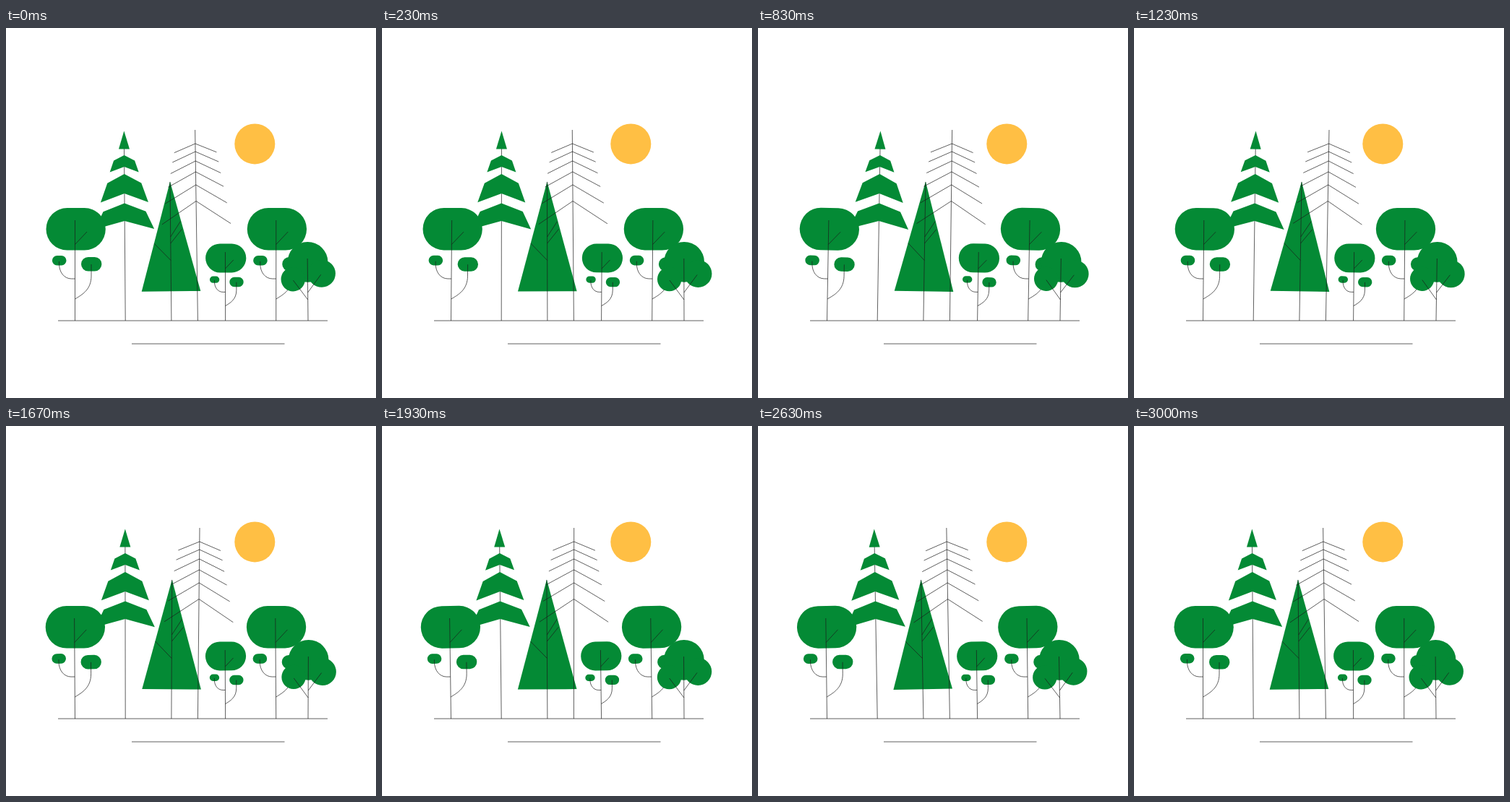
An HTML page for the animation above (3.03 s loop, 512 px wide and 512 px high).

```html
<!DOCTYPE html>
<html lang="en">
<head>
<meta charset="utf-8">
<title>Swaying trees</title>
<style>
  html, body { margin: 0; width: 100%; height: 100%; overflow: hidden; background: #fff; }
  svg { display: block; width: 100vw; height: 100vh; }
  .leaf { fill: #048a35; }
  .line { fill: none; stroke: #1c1c1c; stroke-width: .7; vector-effect: non-scaling-stroke; }
</style>
</head>
<body>
<svg id="scene" viewBox="0 0 512 512">
  <circle cx="344.3" cy="160.4" r="28" fill="#ffbf44"/>
</svg>
<script>
const LOOP = 3030, SWAY = 3000, GROUND = 405;
const scene = document.getElementById('scene');

const leaf = d => `<path class="leaf" d="${d}"/>`;
const line = d => `<path class="line" d="${d}"/>`;
const blob = (x, y, w, h) =>
  `<rect class="leaf" x="${x}" y="${y}" width="${w}" height="${h}" rx="${h / 2}"/>`;
const disc = (x, y, r) => `<circle class="leaf" cx="${x}" cy="${y}" r="${r}"/>`;

// All trees are drawn around their foot at 0,0 with y pointing down.
const roundTree = () =>
  blob(-40, -156, 82.3, 58.5) +
  blob(-31.6, -90, 19.6, 13.6) +
  blob(8.5, -88, 28.4, 19.5) +
  line('M0 0V-139M0 -105.5L16.5 -123') +
  line('M-22 -82V-79C-22 -67 -15 -58 -5 -58H0') +
  line('M0 -30C10 -36 22.5 -43 22.5 -62V-78');

// Each tier: top, shoulder x/y, tip x/y, notch y
const tiers = [
  [-229, 14.5, -221.5, 20, -205.5, -213],
  [-203, 23.5, -190.3, 33, -163.7, -176],
  [-162.5, 29.5, -151, 41, -126.7, -138]
];
const spruce = () =>
  line('M.3 0L0 -240') +
  leaf('M0 -262.5L7.5 -237.5H-7.5Z') +
  tiers.map(([top, sx, sy, tx, ty, notch]) =>
    leaf(`M0 ${top}L${sx} ${sy}L${tx} ${ty}L0 ${notch}L${-tx} ${ty}L${-sx} ${sy}Z`)).join('');

const cone = () =>
  leaf('M0 -192.5L40.8 -40.7H-40.8Z') +
  line('M0 0V-192M0 -83.5L-22.8 -107M0 -107L15.8 -126.5M0 -116L14 -137.5');

// Each twig pair: joint y, half width, drop
const twigs = [
  [-245, 29.3, 12.2], [-234, 32, 14.5], [-221, 34.7, 17],
  [-206, 38.3, 20.7], [-188, 42.7, 25.5], [-165.5, 47.6, 31.7]
];
const barePine = () => line('M0 0V-264' +
  twigs.map(([y, w, drop]) => `M${-w} ${y + drop}L0 ${y}L${w} ${y + drop}`).join(''));

const bush = () =>
  disc(.3, -81.2, 27.9) +
  disc(-20.2, -57.5, 16.7) +
  disc(19.6, -65, 19) +
  line('M0 0V-86M0 -29L-20 -56M0 -39L18.3 -63.5');

// Phase in degrees
const trees = [
  { x: 164.9, phase: -20, art: spruce() },
  { x: 95.5, phase: 0, art: roundTree() },
  { x: 228.9, phase: -35, art: cone() },
  { x: 265.4, phase: -55, art: barePine() },
  { x: 303.6, phase: -6, scale: .683, art: roundTree() },
  { x: 373.7, phase: 1, art: roundTree() },
  { x: 418, phase: -35, art: bush() }
];

for (const tree of trees) {
  tree.node = document.createElementNS('http://www.w3.org/2000/svg', 'g');
  tree.node.innerHTML = tree.art;
  scene.append(tree.node);
}
scene.insertAdjacentHTML('beforeend', line(`M72 ${GROUND}H445M174 437H385.5`));

function draw(now) {
  const turn = Math.min(now % LOOP, SWAY) / SWAY * 360;
  for (const { node, x, phase, scale = 1 } of trees) {
    const angle = Math.sin((turn + phase) * Math.PI / 180);
    node.setAttribute('transform',
      `translate(${x} ${GROUND}) rotate(${angle.toFixed(4)}) scale(${scale})`);
  }
}

const start = performance.now();
function tick() {
  draw(performance.now() - start);
  requestAnimationFrame(tick);
}
tick();
</script>
</body>
</html>
```
